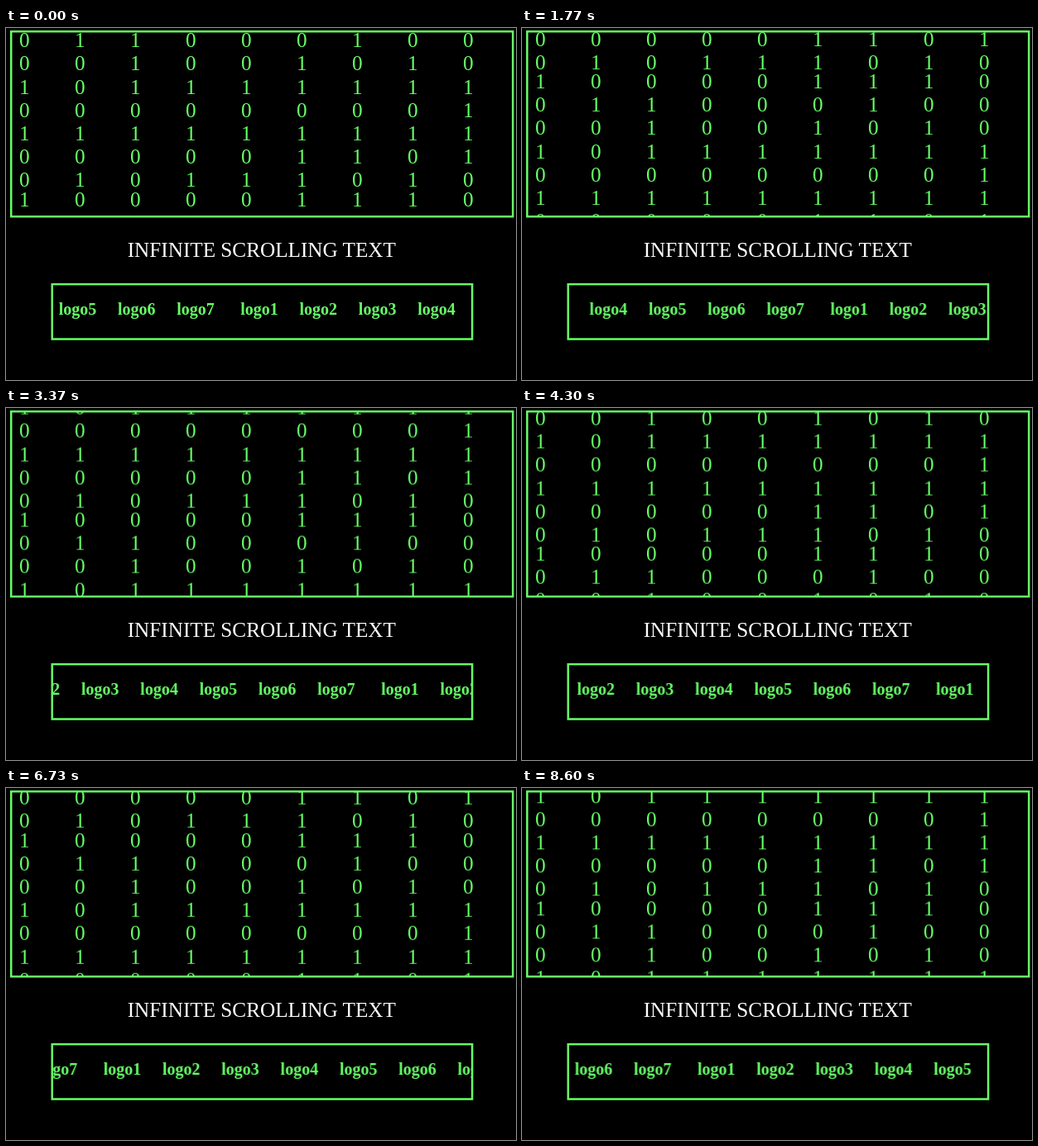
Write an HTML page that moves like this. It is 616x426 px and loops after 8.63 s.

```html
<!DOCTYPE html>
<html lang="en">
<head>
<meta charset="utf-8">
<title>Infinite scrolling text</title>
<style>
  html, body { margin: 0; width: 100%; height: 100%; overflow: hidden; background: #000; }
  svg { display: block; width: 616px; height: 426px; }
  text { font-family: "Liberation Serif", "Times New Roman", serif; fill: #6f6; }
  .frame { fill: none; stroke: #6f6; stroke-width: 2.5; }
  .title { font-size: 25.2px; fill: #fff; text-anchor: middle; }
  #digits text { font-size: 25.2px; text-anchor: middle; }
  #logos text { font-size: 20px; font-weight: bold; }

  #digits, #logos { animation: 8630ms linear infinite; will-change: transform; }
  #digits { animation-name: fall; }
  #logos { animation-name: slide; }
  /* 44.1 px/s and 50.4 px/s */
  @keyframes fall { from { transform: translateY(0); } to { transform: translateY(380.6px); } }
  @keyframes slide { from { transform: translateX(0); } to { transform: translateX(435px); } }
</style>
</head>
<body>
<svg viewBox="0 0 616 426">
  <defs>
    <clipPath id="digitClip"><rect x="7" y="5" width="604" height="222"/></clipPath>
    <clipPath id="logoClip"><rect x="56.5" y="311" width="505.5" height="64.5"/></clipPath>
  </defs>
  <g clip-path="url(#digitClip)"><g id="digits"></g></g>
  <g clip-path="url(#logoClip)"><g id="logos"></g></g>
  <rect class="frame" x="6.2" y="4.2" width="606" height="224"/>
  <rect class="frame" x="55.7" y="310.1" width="507.4" height="66.4"/>
  <text class="title" x="308.8" y="277">INFINITE SCROLLING TEXT</text>
</svg>
<script>
  const rows = [
    "011000100", "001001010", "101111111", "000000001",
    "111111111", "000001101", "010111010", "100001110"
  ];
  const rowPitch = 28.2, lastRowLift = 5.1, digitPeriod = 220.5;
  const logoPitch = 71.3, logoPeriod = 504.8;

  function addText(parent, x, y, content) {
    const el = document.createElementNS("http://www.w3.org/2000/svg", "text");
    el.setAttribute("x", x);
    el.setAttribute("y", y);
    el.textContent = content;
    parent.append(el);
  }

  const digits = document.getElementById("digits");
  const logos = document.getElementById("logos");

  // Copies ahead of the visible one keep both strips filled while they move.
  for (let copy = -2; copy <= 0; copy++) {
    rows.forEach((row, r) => {
      const lift = r === rows.length - 1 ? lastRowLift : 0;
      const y = 23.2 + r * rowPitch - lift + copy * digitPeriod;
      [...row].forEach((digit, c) => addText(digits, 22.2 + c * 67, y, digit));
    });
    for (let n = 0; n < 7; n++) {
      addText(logos, 283.2 + n * logoPitch + copy * logoPeriod, 347, "logo" + (n + 1));
    }
  }
</script>
</body>
</html>
```
